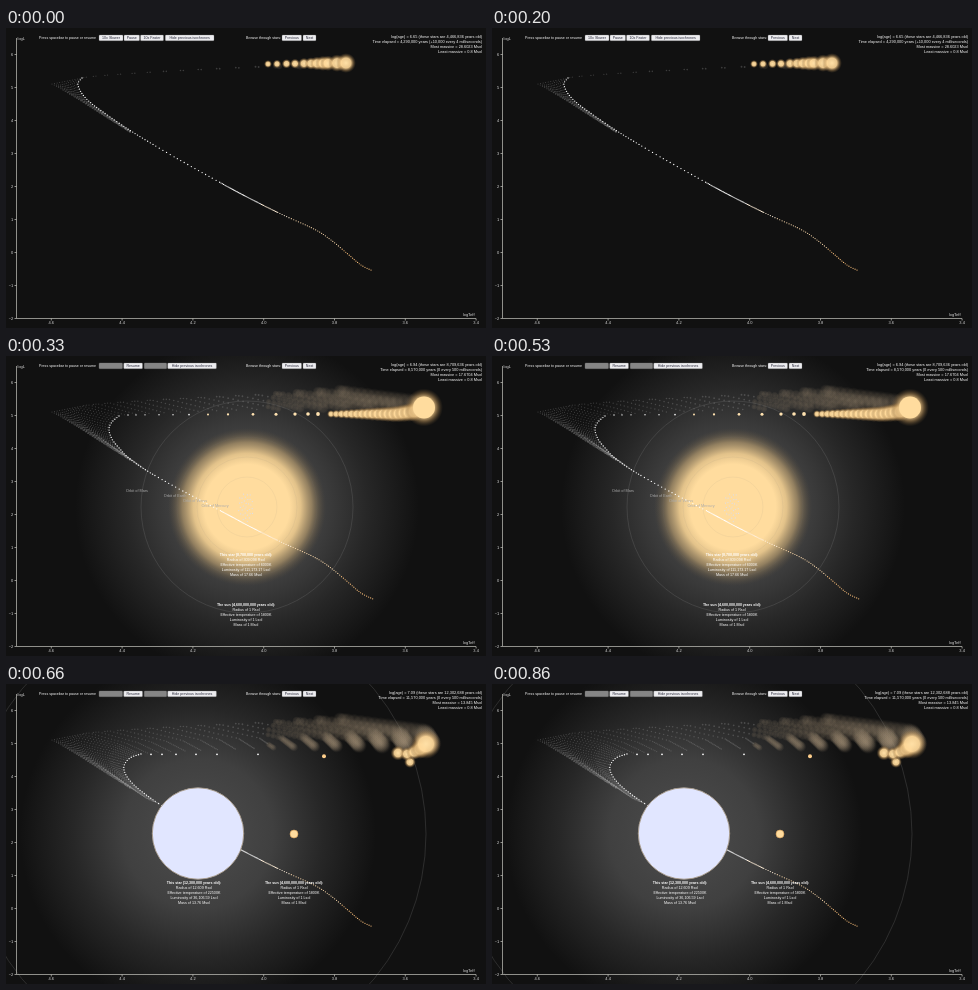
Animation of 480x300 px, one loop 0.99 s. Source, as an HTML page:

```html
<!DOCTYPE html>
<html lang="en">
<head>
<meta charset="utf-8">
<title>Star cluster evolution</title>
<style>
html, body { margin: 0; width: 100%; height: 100%; overflow: hidden; background: #111; }
svg { display: block; width: 480px; height: 300px; font-family: "Liberation Sans", Arial, sans-serif; }
.axis { stroke: #c8c8c0; stroke-width: .7; fill: none; }
text { fill: #fff; font-size: 3.7px; }
.tick { fill: #ddd; font-size: 4px; }
.bar, .btn { font-size: 3.6px; }
.btn { fill: #223; }
.info { font-size: 3.9px; }
.head { font-weight: bold; font-size: 3.6px; }
.orbit { fill: none; stroke: #777; stroke-width: .5; opacity: .55; }
.label { fill: #aaa; font-size: 3.8px; }
.scene { visibility: hidden; animation: show 990ms step-end infinite; }
#s1 { animation-delay: -660ms; }
#s2 { animation-delay: -330ms; }
@keyframes show { 0% { visibility: visible; } 33.3333% { visibility: hidden; } 100% { visibility: hidden; } }
</style>
</head>
<body>
<svg id="stage" viewBox="0 0 480 300">
  <defs>
    <radialGradient id="haze">
      <stop offset="0" stop-color="#4e4e4e"/><stop offset=".42" stop-color="#404040"/>
      <stop offset=".7" stop-color="#272727"/><stop offset="1" stop-color="#111"/>
    </radialGradient>
    <radialGradient id="giant">
      <stop offset=".54" stop-color="#ffdc9e"/><stop offset=".68" stop-color="#e2c28a"/>
      <stop offset=".82" stop-color="#a08a65" stop-opacity=".85"/><stop offset="1" stop-color="#554b3c" stop-opacity="0"/>
    </radialGradient>
    <radialGradient id="glow">
      <stop offset="0" stop-color="#ffe0a6"/><stop offset=".5" stop-color="#ffd898" stop-opacity=".9"/>
      <stop offset=".75" stop-color="#b89058" stop-opacity=".45"/><stop offset="1" stop-color="#6b5130" stop-opacity="0"/>
    </radialGradient>
    <radialGradient id="ghost">
      <stop offset="0" stop-color="#a8947a" stop-opacity=".22"/><stop offset=".7" stop-color="#8a7a64" stop-opacity=".15"/>
      <stop offset="1" stop-color="#776a58" stop-opacity="0"/>
    </radialGradient>
  </defs>
</svg>
<script>
const stage = document.getElementById("stage");

function add(parent, tag, attrs, content) {
  const el = document.createElementNS("http://www.w3.org/2000/svg", tag);
  for (const k in attrs) el.setAttribute(k, attrs[k]);
  if (content) el.textContent = content;
  parent.append(el);
  return el;
}
const dot = (g, x, y, r, fill, opacity = 1) => add(g, "circle", { cx: x, cy: y, r, fill, opacity });
const label = (g, x, y, str, cls, anchor = "start") =>
  add(g, "text", { x, y, class: cls, "text-anchor": anchor }, str);
const mix = (a, b, t) => a + (b - a) * t;

// Hot end of the cluster curve at four ages, youngest first
const hot = [
  [[46, 56], [48, 57], [52, 59], [60, 64], [75, 73], [95, 86], [125, 105], [165, 128]],
  [[76, 50], [72, 55], [73, 60], [77, 67], [85, 75], [97, 84], [125, 103], [165, 127]],
  [[113, 60], [106, 66], [103, 73], [106, 83], [114, 93], [124, 103], [143, 116], [175, 134]],
  [[135, 70], [124, 74], [118, 82], [120, 91], [128, 101], [139, 110], [155, 121], [190, 142]]
];
const cool = [[215, 155], [243, 170], [275, 186], [308, 201], [325, 212], [343, 227], [355, 237], [367, 243]];
const tips = [[300, 30], [340, 36], [418, 50], [424, 60]];

function blend(list, age) {
  const i = Math.min(Math.floor(age), list.length - 2), t = age - i;
  return list[i].map((p, k) => Array.isArray(p)
    ? [mix(p[0], list[i + 1][k][0], t), mix(p[1], list[i + 1][k][1], t)]
    : mix(p, list[i + 1][k], t));
}

// Catmull-Rom walk, calling put(x, y) at the spacing gap(x)
function walk(pts, gap, put) {
  const at = i => pts[Math.max(0, Math.min(pts.length - 1, i))];
  let last = null;
  for (let i = 0; i < pts.length - 1; i++) {
    for (let s = 0; s < 60; s++) {
      const t = s / 60;
      const [x, y] = [0, 1].map(k => {
        const [a, b, c, d] = [at(i - 1)[k], at(i)[k], at(i + 1)[k], at(i + 2)[k]];
        return b + .5 * t * (c - a + t * (2 * a - 5 * b + 4 * c - d + t * (3 * (b - c) + d - a)));
      });
      if (!last || Math.hypot(x - last[0], y - last[1]) >= gap(x)) {
        put(x, y);
        last = [x, y];
      }
    }
  }
}

const tint = x => x < 255 ? "#fff" : x < 285 ? "#ffeed8" : x < 335 ? "#ffdcae" : "#ffc27c";

function cluster(g, age) {
  walk([...blend(hot, age), ...cool],
    x => x < 150 ? 2.5 : x < 215 ? 3.6 : x < 272 ? .8 : 2.1,
    (x, y) => dot(g, x, y, x < 215 ? .65 : .6, tint(x)));
}

function trails(g, from, to, step) {
  for (let age = from; age < to; age += step) {
    const pts = blend(hot, age);
    walk(pts.slice(0, 7), () => 2.5, (x, y) => dot(g, x, y, .5, "#999", .42));
    if (age < .8) continue;
    const [tx, ty] = blend(tips, age), [x0, y0] = pts[0];
    for (let i = 1; i < 17; i++) {
      const t = i / 16, x = mix(x0, tx, t ** 1.35), y = mix(y0, ty, t ** .9);
      if (x < 262) dot(g, x, y, .55 + t * .5, "#999", .32);
      else dot(g, x, y, 3 + (x - 262) / 18, "url(#ghost)");
    }
  }
}

function button(g, x, w, str) {
  add(g, "rect", { x, y: 7, width: w, height: 5.7, rx: .8, fill: str ? "#ededf0" : "#858585", stroke: "#777", "stroke-width": .3 });
  if (str) label(g, x + w / 2, 11.1, str, "btn", "middle");
}

function stats(g, lines) {
  [...lines, "Least massive = 0.8 Msol"].forEach((s, i) => label(g, 476, 10.4 + i * 5, s, "info", "end"));
}

function caption(g, x, y, lines) {
  lines.forEach((s, i) => label(g, x, y + i * 5.1, s, i ? "" : "head", "middle"));
}
const sun = ["The sun (4,600,000,000 years old):", "Radius of 1 Rsol", "Effective temperature of 5800K",
  "Luminosity of 1 Lsol", "Mass of 1 Msol"];

const scenes = [0, 1, 2].map(i => add(stage, "g", { class: "scene", id: "s" + i }));
const [young, middle, old] = scenes;

// Youngest cluster
trails(young, 0, 1, .085);
cluster(young, 1);
for (const [x, r] of [[262, 4], [271, 4.3], [280.5, 4.8], [289, 5], [298, 5.8], [305, 6.3], [311, 7], [317, 7.6], [322, 7.8], [331, 8.8], [340, 10]])
  dot(young, x, 36 - (x - 262) / 80, r, "url(#glow)");
button(young, 93, 24, "10x Slower");
button(young, 118, 15.5, "Pause");
button(young, 134.5, 23, "10x Faster");
button(young, 159.3, 48.7, "Hide previous isochrones");
stats(young, ["log(age) = 6.65 (these stars are 4,466,836 years old)",
  "Time elapsed = 4,290,000 years (+10,000 every 4 milliseconds)", "Most massive = 28.6023 Msol"]);

// Swollen yellow giant
dot(middle, 241, 151, 172, "url(#haze)");
trails(middle, 0, 2, .085);
dot(middle, 241, 151, 79, "url(#giant)");
["Mars", "Earth", "Venus", "Mercury"].forEach((name, i) => {
  const r = [106, 70, 50, 30][i];
  add(middle, "circle", { cx: 241, cy: 151, r, class: "orbit", opacity: i ? .2 : .55, style: i ? "opacity:.15" : "" });
  label(middle, 240 - r - (i ? 1 : 3), 136.3 + i * 5, "Orbit of " + name, "label", "middle");
});
for (let i = 0; i < 34; i++) {
  const a = i * 2.4, r = Math.sqrt(i / 34);
  dot(middle, 240 + 8 * r * Math.cos(a), 151 + 15 * r * Math.sin(a), .6, "#d5defa", .8);
}
cluster(middle, 2);
for (const x of [122, 130, 139, 153, 167, 183, 202, 222, 247, 270, 289, 302, 312])
  dot(middle, x, 59 - (x - 113) / 200, .7 + Math.max(0, x - 170) / 120, x < 200 ? "#fff" : "#ffe2b0");
for (let x = 325; x < 412; x += 5.2)
  dot(middle, x, 58 - Math.max(0, x - 390) / 8, 4 + (x - 325) / 14, "url(#glow)");
dot(middle, 418, 51.5, 19, "url(#glow)");
dot(middle, 418, 51.5, 11, "#ffdc9e");
stats(middle, ["log(age) = 6.94 (these stars are 8,709,636 years old)",
  "Time elapsed = 8,570,000 years (0 every 500 milliseconds)", "Most massive = 17.6704 Msol"]);
caption(middle, 240, 199.6, ["This star (8,700,000 years old):", "Radius of 309.098 Rsol",
  "Effective temperature of 6000K", "Luminosity of 111,173.17 Lsol", "Mass of 17.66 Msol"]);
caption(middle, 240, 249.8, sun);

// Hot blue star beside the sun
dot(old, 192, 150, 178, "url(#haze)");
add(old, "circle", { cx: 192, cy: 150, r: 228, class: "orbit" });
trails(old, 0, 3, .085);
cluster(old, 3);
for (const x of [145, 156, 170, 190, 211, 252]) dot(old, x, 70.3, .9, "#fff");
dot(old, 318, 72.3, 2, "#ffcf8c");
for (const [x, y, r] of [[392, 69, 7.5], [404, 78, 6], [401, 70, 7], [408, 68, 8], [414, 65, 10], [420, 60, 15]])
  dot(old, x, y, r, "url(#glow)");
add(old, "circle", { cx: 192, cy: 149.5, r: 45.7, fill: "#e1e6ff", stroke: "#a89a88", "stroke-width": .9 });
add(old, "circle", { cx: 288, cy: 150, r: 4, fill: "#ffdc9e", stroke: "#d49a55", "stroke-width": .6 });
stats(old, ["log(age) = 7.09 (these stars are 12,302,688 years old)",
  "Time elapsed = 11,570,000 years (0 every 500 milliseconds)", "Most massive = 13.845 Msol"]);
caption(old, 188, 199.6, ["This star (12,300,000 years old):", "Radius of 12.609 Rsol",
  "Effective temperature of 22500K", "Luminosity of 36,106.59 Lsol", "Mass of 13.76 Msol"]);
caption(old, 288, 199.6, sun);

for (const g of [middle, old]) {
  button(g, 93, 23.5);
  button(g, 117.7, 18.8, "Resume");
  button(g, 138.2, 22.5);
  button(g, 161.7, 48.7, "Hide previous isochrones");
}

// Axes and the fixed part of the toolbar
const frame = add(stage, "g", {});
add(frame, "path", { class: "axis", d: "M10.5 10V290.5H470" });
for (let i = 0; i < 9; i++) {
  const y = 26 + i * 33;
  add(frame, "path", { class: "axis", d: `M8.5 ${y + .5}h2` });
  label(frame, 7.3, y + 1.8, String(6 - i).replace("-", "\u2212"), "tick", "end");
}
for (let i = 0; i < 7; i++) {
  const x = 45.3 + i * 70.8;
  add(frame, "path", { class: "axis", d: `M${x} 290.5v2` });
  label(frame, x, 296.2, (4.6 - i * .2).toFixed(1), "tick", "middle");
}
label(frame, 11.5, 11.6, "logL", "tick");
label(frame, 468.5, 288, "logTeff", "tick", "end");
label(frame, 33, 11.1, "Press spacebar to pause or resume", "bar");
label(frame, 240, 11.1, "Browse through stars:", "bar");
button(frame, 276, 19.5, "Previous");
button(frame, 297, 13, "Next");
</script>
</body>
</html>
```
